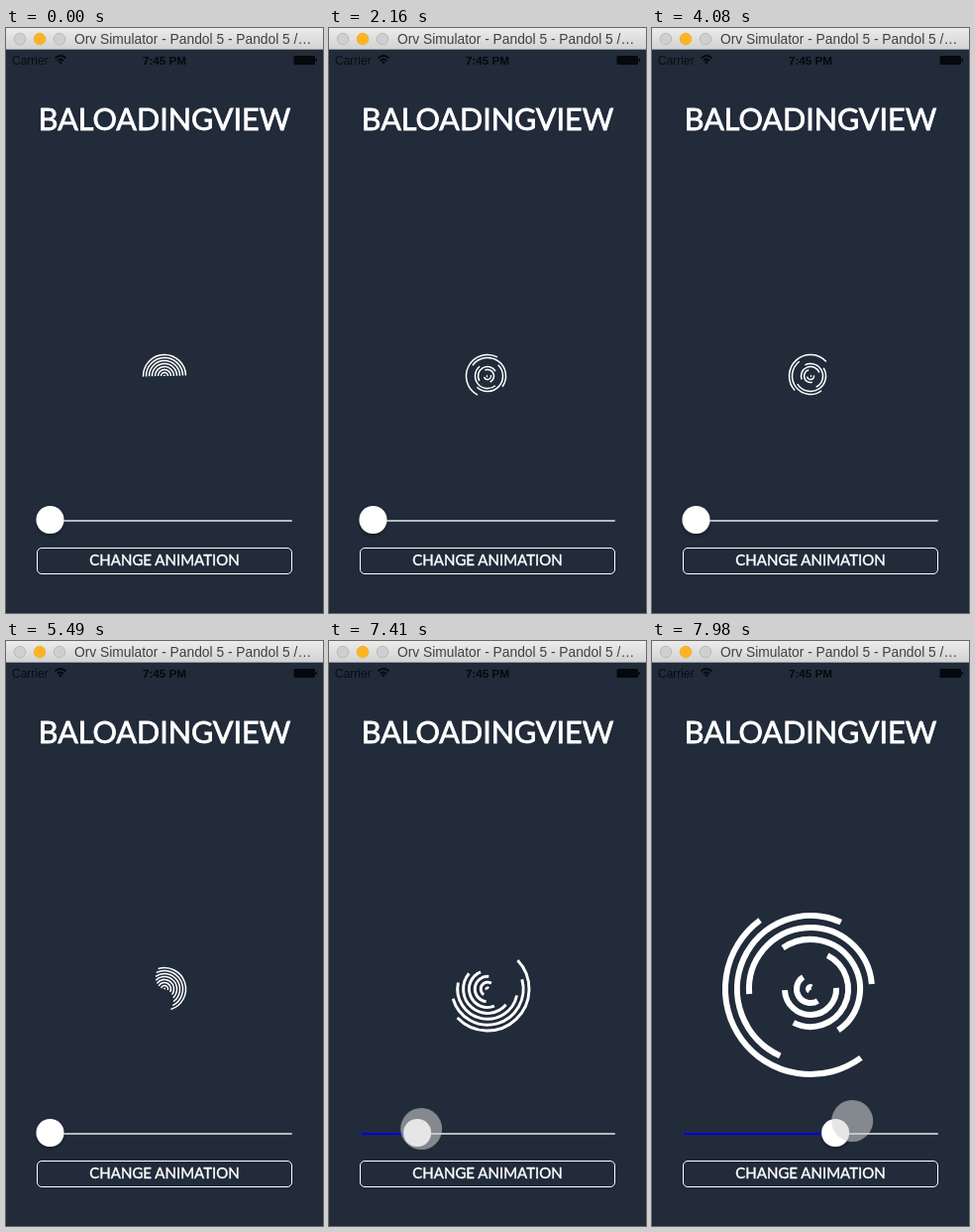
Animation of 320x590 px, one loop 8 s. Source, as an HTML page:

```html
<!DOCTYPE html>
<html lang="en">
<head>
<meta charset="utf-8">
<title>Loading view demo</title>
<style>
  html, body { margin: 0; width: 100%; height: 100%; overflow: hidden; background: #212b39; }
  svg { display: block; width: 320px; height: 590px; }
  .system { font-family: "Liberation Sans", sans-serif; }
  .display { font-family: Lato, sans-serif; fill: #fff; stroke: #fff; text-anchor: middle; }
</style>
</head>
<body>
<svg viewBox="0 0 320 590">
  <defs>
    <linearGradient id="chrome" x2="0" y2="1">
      <stop offset="0" stop-color="#ececec"/>
      <stop offset="1" stop-color="#d1d1d1"/>
    </linearGradient>
    <filter id="shadow" x="-30%" y="-30%" width="160%" height="170%">
      <feDropShadow dx="0" dy="2.5" stdDeviation="1.5" flood-opacity=".35"/>
    </filter>
  </defs>
  <rect width="320" height="590" fill="#212b39"/>

  <!-- Window title bar -->
  <rect width="320" height="22" fill="url(#chrome)"/>
  <rect y="21" width="320" height="1" fill="#92969b"/>
  <g stroke-width=".8">
    <circle cx="14" cy="11" r="5.8" fill="#cfcfcf" stroke="#b3b3b3"/>
    <circle cx="34" cy="11" r="5.8" fill="#fdb424" stroke="#f2aa20"/>
    <circle cx="54" cy="11" r="5.8" fill="#cfcfcf" stroke="#b3b3b3"/>
  </g>
  <text class="system" x="69" y="16" font-size="13.8" fill="#404040">Orv Simulator - Pandol 5 - Pandol 5 /…</text>

  <!-- Status bar -->
  <g class="system" font-size="12" fill="#05080c">
    <text x="6" y="37" opacity=".85">Carrier</text>
    <text x="160" y="37" text-anchor="middle" font-weight="700" font-size="11.7">7:45 PM</text>
    <path d="M49.5 30.5Q55 25.5 60.5 30.5M51.8 33Q55 30 58.2 33" fill="none" stroke="#05080c" stroke-width="1.7"/>
    <path d="M53 34.3Q55 32.8 57 34.3L55 36.5Z"/>
    <rect x="290.5" y="28" width="21.5" height="9" rx="1.5"/>
    <rect x="312.5" y="31" width="1.5" height="3"/>
  </g>

  <text class="display" x="160" y="102.5" font-size="30.5" stroke-width=".8">BALOADINGVIEW</text>

  <g id="loader" fill="none" stroke="#fff" stroke-width="1.5"></g>

  <!-- Slider -->
  <rect x="31" y="496" width="258" height="2" rx="1" fill="#b7b9bc"/>
  <rect id="fill" x="31" y="496" height="2" rx="1" fill="#0000e6"/>
  <circle id="thumb" cy="496" r="14" fill="#fff" filter="url(#shadow)"/>

  <rect x="31.5" y="524.5" width="257" height="26" rx="4.5" fill="none" stroke="#fff"/>
  <text class="display" x="160" y="541.7" font-size="15" stroke-width=".4">CHANGE ANIMATION</text>

  <circle id="touch" r="21" fill="#d3d3d3" fill-opacity=".56"/>
</svg>
<script>
const LOOP = 8000, RINGS = 8, REST_X = 44.5;
const byId = id => document.getElementById(id);
const loader = byId('loader'), fill = byId('fill'), thumb = byId('thumb'), touch = byId('touch');

// Keyframes are [time, value]; phase counts whole spin cycles.
const PHASE = [[0, .017], [1290, .2196], [3000, .4972], [4080, .664], [5490, .887], [7410, 1.195], [8000, 1.288]];
const THUMB_X = [[7080, REST_X], [7290, 69.5], [7410, 89], [7980, 185], [8000, 188]];
const TOUCH_X = [[6360, -22], [6800, 44], [7080, 46], [7290, 72], [7410, 93], [7980, 202], [8000, 206]];
const TOUCH_Y = [[6360, 495], [6800, 496], [7410, 492], [7980, 484]];

function sample(keys, t) {
  if (t <= keys[0][0]) return keys[0][1];
  for (let i = 1; i < keys.length; i++) {
    const [t0, a] = keys[i - 1], [t1, b] = keys[i];
    if (t <= t1) return a + (b - a) * (t - t0) / (t1 - t0);
  }
  return keys[keys.length - 1][1];
}

// cubic-bezier(.42, 0, .58, 1)
function easeInOut(x) {
  let lo = 0, hi = 1, s = .5;
  for (let i = 0; i < 24; i++) {
    s = (lo + hi) / 2;
    const bx = 1.26 * (1 - s) ** 2 * s + 1.74 * (1 - s) * s * s + s ** 3;
    if (bx < x) lo = s; else hi = s;
  }
  return s * s * (3 - 2 * s);
}

// Half circles, innermost first.
const rings = Array.from({ length: RINGS }, (_, i) => {
  const r = .5 + 3 * i;
  const path = document.createElementNS('http://www.w3.org/2000/svg', 'path');
  path.setAttribute('d', `M${-r} 0A${r} ${r} 0 0 1 ${r} 0`);
  return loader.appendChild(path);
});

function draw(t) {
  const x = sample(THUMB_X, t);
  const scale = 1 + (x - REST_X) * .02135;
  loader.setAttribute('transform', `translate(160 351) scale(${scale})`);

  // Ring n makes n counterclockwise turns per cycle.
  const turn = 360 * easeInOut(sample(PHASE, t) % 1);
  rings.forEach((ring, i) => ring.setAttribute('transform', `rotate(${-(i + 1) * turn})`));

  thumb.setAttribute('cx', x);
  fill.setAttribute('width', x - 31);
  fill.setAttribute('visibility', x > REST_X ? 'visible' : 'hidden');
  touch.setAttribute('cx', sample(TOUCH_X, t));
  touch.setAttribute('cy', sample(TOUCH_Y, t));
}

const start = performance.now();
function frame() {
  draw((performance.now() - start) % LOOP);
  requestAnimationFrame(frame);
}
frame();
</script>
</body>
</html>
```
